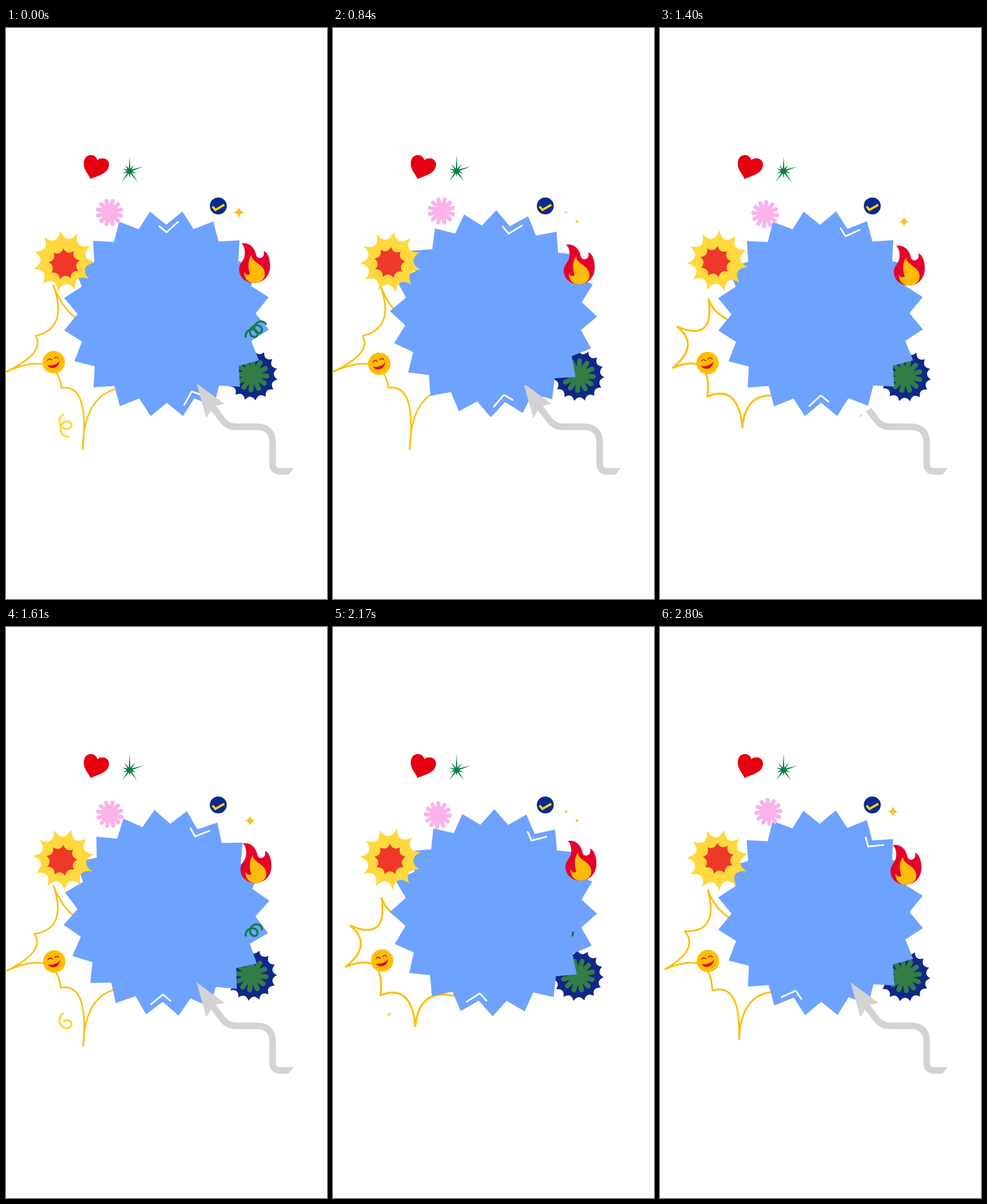
Recreate the animation shown at these times as an HTML page. Size 561 by 998 pixels, loop 2870 ms.

```html
<!DOCTYPE html>
<html>
<head>
<meta charset="utf-8">
<style>
  html, body { margin: 0; width: 100%; height: 100%; overflow: hidden; background: #fff; }
  svg { display: block; width: 561px; height: 998px; }
  .line { fill: none; stroke-linecap: round; stroke-linejoin: round; }
</style>
</head>
<body>
<svg viewBox="0 0 561 998">
  <mask id="reveal" maskUnits="userSpaceOnUse" x="0" y="0" width="561" height="998">
    <path id="wipe" pathLength="1" fill="none" stroke="#fff" stroke-width="64"
      d="M505 775H480Q466 775 466 762V725Q466 697 438 697H402Q387 697 378 685L331 618"/>
  </mask>

  <g id="navy">
    <path id="navyStar" fill="#10278a"/>
    <path id="navyFlower" class="line" stroke="#327d46" stroke-width="8.5"/>
  </g>
  <path id="outline" class="line" stroke="#fdbf0a"/>
  <g id="smiley">
    <circle r="19.6" fill="#ffbf00"/>
    <path fill="#e8002d" d="M-11 5Q2 8 11-3Q9 8 0 10Q-8 11-11 5"/>
    <path class="line" stroke="#e8002d" stroke-width="1.6" d="M-11-3q3-5 8-1M1-7q4-4 7 0"/>
  </g>

  <g id="badge">
    <path id="badgeStar" fill="#6ea2ff" transform="rotate(-9.2)"/>
    <g class="line" stroke="#fff" stroke-width="3">
      <path d="M-12.5-153L0-142.5L20-160.5"/>
      <path transform="rotate(-17.9)" d="M-19.5 161L-1 144Q.5 142.5 2 144L14 153.5"/>
    </g>
  </g>

  <path id="pink" class="line" stroke="#f9b3e8" stroke-width="7.2"/>
  <path id="sun" fill="#ffd83d"/>
  <path id="core" fill="#ef382a"/>
  <path id="heart" fill="#e50012"
    d="M2-11C-2-25-24-25-24-4C-24 8-16 14-11 25C0 19 24 16 24-3C23-16 8-17 2-11Z"/>
  <path id="spark" fill="#0b7f43" transform="translate(216 250)"/>
  <circle cx="371" cy="311" r="14.8" fill="#0a2a8c"/>
  <path d="M361 312L366 318L381.500 309" fill="none" stroke="#ffd21e" stroke-width="4"/>
  <path id="twinkleA" fill="#fcbf2c"/>
  <path id="twinkleB" fill="#fcbf2c"/>

  <g id="fire">
    <path fill="#e8002d" d="M413 377C428 374 437 386 439 398C441 405 455 404 452 390C461 393 464 410 463 420C461 437 448 446 436 446C420 446 409 436 409 422C409 410 419 408 419 394C419 385 417 380 413 377Z"/>
    <path fill="#fdbb0a" d="M431 397C430 410 452 412 454 428C455 440 445 446 436 446C426 446 417 439 418 426C420 432 425 433 428 430C424 420 424 405 431 397Z"/>
  </g>
  <path id="curlGreen" class="line" pathLength="1" stroke="#137d4b" stroke-width="3.6"/>
  <path id="curlYellow" class="line" pathLength="1" stroke="#ffd83d" stroke-width="3.6"/>

  <g mask="url(#reveal)" fill="#d3d3d3">
    <path fill="none" stroke="#d3d3d3" stroke-width="11.500"
      d="M493.500 775H480Q466 775 466 762V725Q466 697 438 697H402Q387 697 378 685L360 661"/>
    <path d="M493 769.300L503 769L493.500 781Z"/>
    <path d="M333 621L382 657L363 661L350 682Z"/>
  </g>
</svg>
<script>
const LOOP = 2870, STEP = 70, TURN = 2 * Math.PI;
const $ = id => document.getElementById(id);
const set = (id, name, value) => $(id).setAttribute(name, value);
const place = (id, x, y, turn = 0, size = 1) =>
  set(id, 'transform', `translate(${x} ${y}) rotate(${turn}) scale(${size})`);

// Timing helpers
const clamp = v => Math.max(0, Math.min(1, v));
const smooth = v => { const k = clamp(v); return k * k * (3 - 2 * k); };
const mix = (a, b, k) => a + (b - a) * k;
const wave = (u, mid, swing, peak, period = 1) =>
  mid + swing * Math.cos(TURN * (u - peak) / period);
// Distance in time to the nearest repeat of a moment
const away = (t, moment, period) => {
  const d = Math.abs(t - moment) % period;
  return Math.min(d, period - d);
};

// Shape helpers: radius and degrees clockwise from the top
const polar = (r, deg) => {
  const a = deg * TURN / 360;
  return `${(r * Math.sin(a)).toFixed(2)} ${(-r * Math.cos(a)).toFixed(2)}`;
};
const repeat = (n, make) => Array.from({ length: n }, (_, i) => make(i * 360 / n, i));
const scallop = (n, outer, inner) => 'M' + polar(outer, 0) +
  repeat(n, a => `Q${polar(inner, a + 180 / n)} ${polar(outer, a + 360 / n)}`).join('') + 'Z';
const petals = (n, r) => repeat(n, a => `M0 0L${polar(r, a)}`).join('');
const teeth = (n, outer, inner) =>
  'M' + repeat(n, (a, i) => `${polar(outer(a, i), a)}L${polar(inner, a + 180 / n)}`).join('L') + 'Z';

// A circling pen whose centre slides by (dx, dy)
const coil = (x, y, dx, dy, r, from, turns) => 'M' + repeat(49, (_, i) => {
  const k = i / 48, a = TURN * (from + turns * k);
  return `${(x + dx * k + r * Math.cos(a)).toFixed(1)} ${(y + dy * k + r * Math.sin(a)).toFixed(1)}`;
}).join('L');

// Uneven ten-pointed star in one of three poses
const spark = pose => teeth(10, (a, i) => {
  const long = i % 2 === 0 && i !== 8;
  return (long ? 25 : 13) + 4 * Math.sin(2.1 * pose) * Math.cos(a * TURN / 360);
}, 4.5);

const WIDE = 'M135 516Q100 496 83 450Q109 525 52 538Q69 568 0 601Q88 562 97 629Q146 621 134 736Q136 646 192 631';
const TIGHT = 'M130 515Q93 500 85 474Q96 550 30 522Q71 555 22 594Q92 565 83 644Q137 622 144 698Q151 625 222 648';
const tightNumbers = TIGHT.match(/\d+/g);
const morph = k => {
  let i = 0;
  return WIDE.replace(/\d+/g, v => mix(+v, +tightNumbers[i++], k).toFixed(1));
};

set('badgeStar', 'd', teeth(20, () => 181, 155.5));
set('navyStar', 'd', scallop(15, 45, 32));
set('navyFlower', 'd', petals(12, 26));
set('pink', 'd', petals(12, 20.8));
set('sun', 'd', scallop(11, 54, 28));
set('core', 'd', scallop(9, 27.5, 16));
set('twinkleA', 'd', scallop(4, .5, .1));
set('twinkleB', 'd', scallop(4, .5, .1));
set('curlGreen', 'd', coil(427, 537, 19, -17, 8.5, .45, 2.5));
set('curlYellow', 'd', coil(103, 685, 3, 20, 10, -.3, -1.5));

function trim(id, length) {
  set(id, 'stroke-dasharray', `${length} 2`);
  set(id, 'visibility', length > 0 ? 'visible' : 'hidden');
}

function draw(t) {
  const tick = t / STEP, s = t / 1000, u = t / LOOP;

  // Steady spins and gentle drifts
  place('badge', 280.5, 499.5, 12.76 * s);
  place('navy', 430 - 2.5 * u, 606.5 + 3.5 * u, 4 - 36 * s);
  place('pink', wave(u, 185, 4.5, .29, .68), wave(u, 324, 5, .7), 15 + 36 * s);
  place('sun', 100.5, wave(u, 407.3, 2, .22), 53.5 * s - 6);
  place('core', wave(u, 99.5, 2.5, 0), 412.5 - 8 * u, wave(u, 2, 6, .45));
  place('smiley', wave(u, 83.3, 2.6, .75), wave(u, 584.8, 2, .3));
  place('fire', wave(u, -2.8, 3.6, .58, .72), wave(u, 1, 4, .42, .6));

  // Pops, twinkles and stepped poses
  place('heart', 158, 241, 0, .92 * clamp(away(t, 378, LOOP / 4) / 200));
  place('twinkleA', 407, 322.5, 0, 20 * clamp(1 - away(t, 0, LOOP) / 1100));
  place('twinkleB', 426.5, 338.5, 0, 20 * clamp(1 - away(t, 1500, LOOP) / 1100));
  set('spark', 'd', spark(Math.floor(tick / 3) % 3));

  const tight = clamp(.5 + (3 - away(tick, 7.2, 12)) / 2);
  set('outline', 'd', morph(tight));
  set('outline', 'stroke-width', mix(2.8, 3.4, tight));

  // Lines that draw on and off
  const curl = clamp(1.2 * (1 - away(tick, .6, 25) / 5.6));
  trim('curlGreen', curl);
  trim('curlYellow', curl);
  trim('wipe', smooth(Math.min(Math.abs(tick - 16.5), Math.abs(tick - 31)) / 5));
}

function run(now) {
  draw(Math.floor(now % LOOP / STEP) * STEP);
  requestAnimationFrame(run);
}
draw(0);
requestAnimationFrame(run);
</script>
</body>
</html>
```
